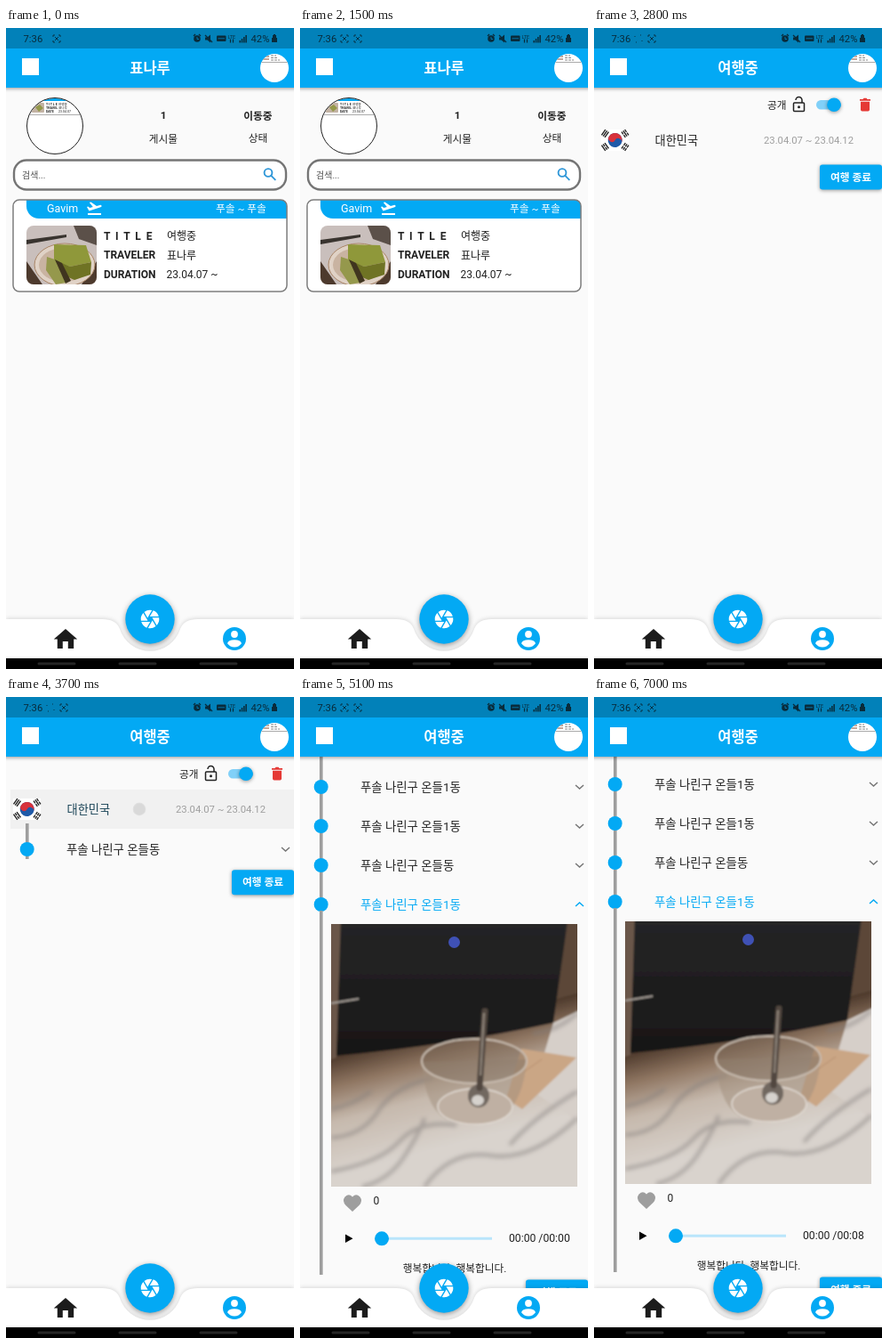
An HTML page that plays this animation: 324x720 px, repeating every 7.1 s.

```html
<!DOCTYPE html>
<html lang="ko">
<head>
<meta charset="utf-8">
<title>Travel log</title>
<style>
html, body { margin: 0; width: 100%; height: 100%; overflow: hidden; background: #fafafa; }
svg { display: block; width: 100vw; height: 100vh; }
text { font-family: Roboto, "Noto Sans CJK KR", "Noto Sans CJK", sans-serif; white-space: pre; fill: #212121; }
.b { font-weight: 700; }
.m { text-anchor: middle; }
.w { fill: #fff; }
.blue { fill: #03a9f4; }
.line { fill: none; stroke-width: 1.5; }
.raised { filter: drop-shadow(0 1.5px 2px #0006); }
.floating { filter: drop-shadow(0 2.5px 3px #0006); }
#trip { transform-origin: 162px 360px; }
</style>
</head>
<body>
<svg viewBox="0 0 324 720" preserveAspectRatio="none">
  <defs>
    <clipPath id="cRows"><rect id="rowsClip" width="324" height="273"/></clipPath>
    <clipPath id="cDetail"><rect id="detailClip" width="324" height="416"/></clipPath>
    <clipPath id="cFace"><circle cx="55" cy="110" r="31"/></clipPath>
    <clipPath id="cFace2"><circle cx="302" cy="45" r="16"/></clipPath>
    <clipPath id="cCake"><rect x="23" y="222" width="79" height="66" rx="8"/></clipPath>
    <clipPath id="cPhoto"><rect x="35" y="252" width="277" height="295"/></clipPath>
    <linearGradient id="table" gradientUnits="userSpaceOnUse" x1="140" y1="375" x2="172" y2="500">
      <stop offset="0" stop-color="#4e3a2c"/><stop offset=".25" stop-color="#8f7662"/>
      <stop offset=".55" stop-color="#c6b9ad"/><stop offset="1" stop-color="#d9d3cd"/>
    </linearGradient>
    <linearGradient id="lid" x1="0" y1="0" x2="0" y2="1">
      <stop offset="0" stop-color="#262627"/><stop offset="1" stop-color="#181717"/>
    </linearGradient>
    <filter id="soft"><feGaussianBlur stdDeviation="1.1"/></filter>
    <filter id="hazy"><feGaussianBlur stdDeviation="2"/></filter>
  </defs>
  <rect width="324" height="720" fill="#fafafa"/>

  <g id="profile">
    <g clip-path="url(#cFace)">
      <rect x="23" y="78" width="64" height="64" fill="#fff"/>
      <rect x="28" y="78" width="60" height="4" class="blue"/>
      <rect x="29" y="84" width="14" height="11" rx="1" fill="#c3b3a4"/>
      <path d="M33 89l5-3 4 4-5 4z" fill="#94994a"/>
      <path d="M24 97.500H87" stroke="#999" stroke-width=".8"/>
      <g font-size="3.600"><text class="b" x="45" y="87">T I T L E</text><text x="59" y="87">여행중</text>
      <text class="b" x="45" y="91">TRAVEL</text><text x="59" y="91">표나루</text>
      <text class="b" x="45" y="95">DATE</text><text x="59" y="95">23.04.07</text></g>
    </g>
    <circle cx="55" cy="110" r="31.500" fill="none" stroke="#222"/>
    <g class="m" font-size="11.700">
      <text class="b" x="177" y="102">1</text><text class="b" x="283.500" y="102.500">이동중</text>
      <text x="177" y="128.500">게시물</text><text x="283.500" y="128">상태</text>
    </g>
    <rect x="9" y="148.500" width="306" height="33" rx="14" fill="#fff" stroke="#757575" stroke-width="2.400"/>
    <text x="18" y="169" font-size="10" style="fill:#555">검색...</text>
    <g fill="none" stroke="#2f97d8" stroke-width="1.900"><circle cx="295" cy="162.500" r="4.400"/><path d="M298.300 165.800l5 5"/></g>

    <rect x="8" y="193" width="308" height="103" rx="7" fill="#fff"/>
    <path class="blue" d="M23 193H309Q316 193 316 200V214H37A14 14 0 0 1 23 200Z"/>
    <rect x="8" y="193" width="308" height="103" rx="7" fill="none" stroke="#7d7d7d" stroke-width="1.500"/>
    <text class="w" x="46" y="207" font-size="12.500">Gavim</text>
    <g class="w"><rect x="92" y="208" width="15" height="2"/>
      <path d="M91 201l1.300-.4 2 1.500 3.500-1-4-5 1.700-.5 6.500 4.300 3.600-1q1.800-.2 2 1 0 1-1.200 1.400L93.500 205.500Z"/></g>
    <text class="w" x="236" y="207" font-size="11.700">푸솔 ~ 푸솔</text>
    <g clip-path="url(#cCake)">
      <rect x="23" y="222" width="79" height="66" fill="#c9bfbc"/>
      <path d="M76 222h26v22l-20-7z" fill="#5b5049"/><path d="M23 238l45-6v3l-45 8z" fill="#39342f"/>
      <path d="M23 262l18 26H23zM102 262v26H85z" fill="#4d3a2d"/>
      <ellipse cx="66" cy="266" rx="34" ry="24" fill="#e0d2c6" stroke="#a98567"/>
      <ellipse cx="65" cy="266" rx="28" ry="19" fill="#c9b3a1"/>
      <path d="M54 243l36 1 6 19-24 5-18-7z" fill="#8f983a"/><path d="M54 260l18 8 24-5-1 14-18 6-18-8z" fill="#6f7324"/>
      <path d="M46 257l9 3 13 26-12 2-11-16z" fill="#95984c"/><path d="M55 260l8 4 10 20-6 3z" fill="#40351f"/>
    </g>
    <g font-size="12">
      <text class="b" x="110" y="237.500">T  I  T  L  E</text><text x="181" y="238">여행중</text>
      <text class="b" x="110" y="259.300">TRAVELER</text><text x="181" y="260">표나루</text>
      <text class="b" x="110" y="281.300">DURATION</text><text x="180.500" y="281.300">23.04.07 ~</text>
    </g>
  </g>

  <g id="trip">
    <rect width="324" height="720" fill="#fafafa"/>
    <g id="scroll">
      <text x="195" y="90.500" font-size="11.700">공개</text>
      <g class="line" stroke="#222"><rect x="224.500" y="84" width="12" height="9.500" rx="1"/><path d="M227 81a3.500 3.500 0 0 1 7 0v3"/></g>
      <circle cx="230.500" cy="88.700" r="1.500" fill="#222"/>
      <rect x="250" y="81" width="28" height="10.500" rx="5.200" fill="#81d0f8"/>
      <circle class="blue raised" cx="270" cy="86.200" r="7.800"/>
      <path d="M299 80h3.500l1-1.200h3l1 1.200h3.500v1.800h-12zM300 82.800h10v9q0 1.700-1.700 1.700h-6.600q-1.700 0-1.700-1.700z" fill="#e53935"/>
      <g id="taps"></g>
      <g id="flag"></g>
      <text id="country" x="68.500" y="131" font-size="13.200">대한민국</text>
      <text x="191" y="130.300" font-size="11.250" style="fill:#9e9e9e">23.04.07 ~ 23.04.12</text>
      <g clip-path="url(#cRows)" id="rows"></g>
      <g clip-path="url(#cDetail)"><g transform="translate(0 161)">
        <rect x="22" y="237" width="3.600" height="409" fill="#9e9e9e"/>
        <g clip-path="url(#cPhoto)"><g filter="url(#soft)">
          <rect x="25" y="242" width="297" height="315" fill="url(#table)"/>
          <path d="M285 363L322 345V480L262 440z" fill="#d6cfc9"/>
          <path d="M25 242h297v85l-36 10z" fill="#5b4739"/>
          <path d="M25 242h24l-8 160-16 6z" fill="#6b5648"/>
          <g id="veins" fill="none" stroke="#827d7b" stroke-width="4" opacity=".55" filter="url(#hazy)"></g>
          <path d="M46 242H302L285 363Q170 388 41 400Z" fill="url(#lid)"/>
          <path d="M35 341l31-5" stroke="#a49d96" stroke-width="2"/>
          <path d="M249 392l62 10-61 58-18-12z" fill="#caa685"/><path d="M252 418l20-14" stroke="#b68f6d"/>
          <path d="M137 407Q140 455 162 470Q195 486 229 468Q252 448 255 404Z" fill="#a18f7f" opacity=".5"/>
          <ellipse cx="196" cy="406" rx="59" ry="25" fill="#7d6a5b" fill-opacity=".45" stroke="#c9bdb1" stroke-width="2"/>
          <ellipse cx="197" cy="457" rx="42" ry="20" fill="#bfb0a3" stroke="#e3dcd5" stroke-width="1.500"/>
          <ellipse cx="201" cy="445" rx="12" ry="13" fill="#716860"/><ellipse cx="200" cy="450" rx="7" ry="6" fill="#d6d2cd"/>
          <path d="M208 350L202 436" stroke="#51473f" stroke-width="7" stroke-linecap="round"/>
          <path d="M207 352l-4 70" stroke="#92877d" stroke-width="2"/>
        </g></g>
        <circle cx="173.500" cy="272.500" r="6.500" fill="#3f51b5"/>
        <path d="M59 575l-7.500-7q-4.500-5-1-9.500 4.500-4.500 8.500 0 4-4.500 8.500 0 3.500 4.500-1 9.500z" fill="#9e9e9e"/>
        <text x="82.500" y="567" font-size="12">0</text>
        <path d="M51 600.500v9.500l8.500-4.800z"/>
        <path d="M92 605.300H216" stroke="#b9e5fb" stroke-width="3"/><circle class="blue" cx="92" cy="605.300" r="8"/>
        <g font-size="12.200"><text id="unloaded" x="235" y="609.300">00:00 /00:00</text><text id="loaded" x="235" y="609.300">00:00 /00:08</text></g>
        <text class="m" x="174" y="643" font-size="11.700">행복합니다. 행복합니다.</text>
      </g></g>
      <g id="finish"><rect class="blue raised" x="254" y="153.500" width="70" height="28" rx="3"/>
        <text class="b w m" x="289" y="171.700" font-size="11.700">여행 종료</text></g>
    </g>
  </g>

  <g>
    <rect class="blue raised" x="-4" y="0" width="332" height="67"/>
    <rect width="324" height="23" fill="#0281b9"/>
    <g id="status" fill="#092b3b" stroke="#092b3b" stroke-width="0"></g>
    <rect class="w" x="18" y="34" width="19" height="19"/>
    <text class="b w m" id="name" x="162" y="51" font-size="16.500">표나루</text>
    <text class="b w m" id="tripName" x="162" y="51" font-size="16.500">여행중</text>
    <circle class="w" cx="302" cy="45" r="16"/>
    <g clip-path="url(#cFace2)" stroke-width="1"><path d="M286 38.500h32" stroke="#aaa"/><path d="M289 32h7M289 35h7" stroke="#c5a79a" stroke-width="2"/>
      <path d="M298 31h6M298 33.500h8M298 36h10" stroke="#888" stroke-dasharray="3 1"/></g>
  </g>

  <path class="w" style="filter:drop-shadow(0 -1px 2px #0002)" d="M0 664H108Q124 664 128 675A35.700 35.700 0 0 0 196 675Q200 664 216 664H324V708H0Z"/>
  <path d="M63.800 697v-8h6v8h6.400v-10.500h4L67 675 53.800 686.500h4V697z" fill="#1c1c1c"/>
  <circle class="blue" cx="257" cy="686" r="13"/>
  <circle class="w" cx="257" cy="681" r="3.900"/><path class="w" d="M249 691.200q1-4 8-4t8 4q-3 4.200-8 4.200t-8-4.200z"/>
  <circle class="blue floating" cx="162" cy="664" r="27.700"/>
  <g id="shutter" class="w" transform="translate(162 664)"></g>
  <rect y="708" width="324" height="12"/>
  <path d="M37 714H77M128 714H168M219 714H259" stroke="#262626" stroke-width="3" stroke-linecap="round"/>
</svg>
<script>
const LOOP = 7100, FRAME = 100, BLUE = '#03a9f4', INK = '#212121';
const $ = id => document.getElementById(id);
const add = (id, markup) => $(id).insertAdjacentHTML('beforeend', markup);

// Static repeats
const places = ['온들동', '온들1동', '온들1동', '온들1동', '온들동', '온들1동'];
add('rows', '<rect x="22" y="142" width="3.600" height="249" fill="#9e9e9e"/>' + places.map((place, i) => {
  const y = 171 + i * 44, last = i === places.length - 1;
  const chevron = (id, dir, color) => `<path ${id} class="line" d="M310 ${y - 2 * dir}l4.500 ${4 * dir} 4.500 ${-4 * dir}" stroke="${color}"/>`;
  return `<circle class="blue" cx="23.700" cy="${y}" r="8"/>
    <text ${last ? 'id="lastPlace"' : ''} x="68" y="${y + 4.7}" font-size="13.400">푸솔 나린구 ${place}</text>`
    + chevron(last ? 'id="down"' : '', 1, '#757575') + (last ? chevron('id="up"', -1, BLUE) : '');
}).join(''));

const trigram = (x, y, angle, broken) => `<g transform="translate(${x} ${y}) rotate(${angle})">` +
  [-2.2, 0, 2.2].map((dy, i) => `<path d="M-3.800 ${dy}h7.600" stroke="#222" stroke-width="1.400" ${broken[i] ? 'stroke-dasharray="3.300 1"' : ''}/>`).join('') + '</g>';
add('flag', `<rect x="8" y="114" width="31" height="24" fill="#fff"/><g transform="rotate(30 23.700 126)">
  <circle cx="23.700" cy="126" r="8" fill="#1f5aa8"/>
  <path d="M15.700 126a8 8 0 0 1 16 0a4 4 0 0 0-8 0a4 4 0 0 1-8 0z" fill="#d8323c"/></g>` +
  trigram(12.5, 118.5, -55, [0, 0, 0]) + trigram(35, 118.5, 55, [1, 0, 1]) +
  trigram(12.5, 133.5, 55, [0, 1, 0]) + trigram(35, 133.5, -55, [1, 1, 1]));

for (let a = 0; a < 360; a += 60)
  add('shutter', `<path d="M-2.700-1.500L2.200-10A10.300 10.300 0 0 0-6.500-8L-2.800-1.400Z" transform="rotate(${a})"/>`);

add('veins', ['M35 492Q70 490 88 462T150 425', 'M35 530Q90 520 112 496T176 478', 'M70 547Q100 540 118 512T140 470',
  'M140 547Q170 505 215 512T312 470', 'M35 460Q60 455 80 440', 'M262 375Q290 372 312 352', 'M236 500Q262 470 312 440'].map(d => `<path d="${d}"/>`).join(''));

const bracket = (id, x, dots = false) => `<g id="${id}" fill="none" stroke-width=".9" transform="translate(${x} 12)">
  <path d="M-4-2v-2h2M2-4h2v2M4 2v2h-2M-2 4h-2v-2" ${dots ? 'stroke-dasharray="1 3"' : ''}/>${dots ? '' : '<path d="M-2-2l4 4M2-2l-4 4"/>'}</g>`;
const label = (x, y, size, s) => `<text x="${x}" y="${y}" font-size="${size}" style="fill:#092b3b">${s}</text>`;
add('status', label(19.5, 15.5, 11.3, '7:36') + bracket('single', 57) + bracket('left', 50) + bracket('leftDots', 50, true) + bracket('right', 65) +
  `<circle cx="215" cy="12" r="3.800"/><path d="M211 9l2-2M219 9l-2-2" stroke-width="1.300"/><path d="M215 10v2.500h2" fill="none" stroke="#0281b9" stroke-width=".9"/>
  <path d="M224 10.500h2.500l3.500-3v9l-3.500-3H224z"/><path d="M224 8l8 8" stroke-width="1.200"/>
  <rect x="237" y="8.500" width="10.500" height="6.500" rx="1"/><path d="M238.500 11.700h7.500" stroke="#0281b9" stroke-width=".8"/>` +
  label(249.5, 11.5, 5.5, 'LTE') + `<path d="M252.500 16.500v-4M255.500 12.500v4" stroke-width="1.200"/>` +
  [0, 1, 2, 3].map(i => `<rect x="${262.5 + i * 2.3}" y="${14 - i * 2}" width="1.500" height="${2.5 + i * 2}"/>`).join('') +
  label(275.5, 15.5, 11.3, '42%') + '<path d="M300 8h1v-1h2v1h1v3h1v5h-6v-5h1z"/>');

// Motion: each track is a table of [ms, value]
const tracks = [];
function move(id, prop, table, hard = false) {
  const points = [[0, table[0][1]], ...table, [LOOP, table[table.length - 1][1]]];
  const keys = points.map(([ms, value]) => ({ offset: ms / LOOP, [prop]: value, easing: hard ? 'steps(1, end)' : 'linear' }));
  const track = $(id).animate(keys, { duration: LOOP, iterations: Infinity });
  track.pause();
  tracks.push(track);
}
const show = (id, ...spans) => move(id, 'opacity', [[0, 0], ...spans.flatMap(([from, to]) => [[from, 1], [to, 0]])], true);
const shift = table => table.map(([ms, y]) => [ms, `translateY(${y}px)`]);
const reveal = (top, table) => table.map(([ms, k]) => [ms, `translateY(${top}px) scaleY(${k})`]);

function tap(name, x, y, start) {
  add('taps', `<rect id="${name}Row" x="5" y="${y - 22}" width="319" height="44" fill="#0000000a"/>
    <clipPath id="${name}Clip"><rect x="5" y="${y - 22}" width="319" height="44"/></clipPath>
    <g clip-path="url(#${name}Clip)"><circle id="${name}Ink" cx="${x}" cy="${y}" r="6.500" fill="#0000001a"/></g>`);
  move(name + 'Row', 'opacity', [[start - 100, 0], [start + 100, .8], [start + 300, 1], [start + 500, 0]]);
  move(name + 'Ink', 'opacity', [[start, 0], [start + 100, 1], [start + 200, 1], [start + 450, 0]]);
  $(name + 'Ink').style.transformOrigin = `${x}px ${y}px`;
  move(name + 'Ink', 'transform', [[start + 100, 'scale(.8)'], [start + 200, 'scale(1)'], [start + 450, 'scale(28)']]);
}
tap('country', 150, 126, 3500);
tap('place', 191, 391, 4500);

const fadeIn = [[2400, 0], [2800, 1]], fadeOut = [[2400, 1], [2800, 0]];
move('trip', 'opacity', fadeIn);
move('trip', 'transform', [[2400, 'scale(.9)'], [2800, 'scale(1)']]);
move('tripName', 'opacity', fadeIn);
move('name', 'opacity', fadeOut);
move('profile', 'opacity', fadeOut);

const unfold = [[3600, 0], [3700, .15], [3800, .55], [3900, .9], [4000, 1]];
const open = [[4700, 0], [4800, .3], [4900, .8], [5000, 1]];
move('rowsClip', 'transform', reveal(140, unfold));
move('detailClip', 'transform', reveal(391, open));
move('finish', 'transform', shift([...unfold.map(([ms, k]) => [ms, 265 * k]), ...open.map(([ms, k]) => [ms, 265 + 394 * k])]));
move('scroll', 'transform', shift([[4800, 0], [4900, -60], [5000, -130], [5100, -158], [5200, -161]]));
move('country', 'fill', [[3600, INK], [4000, BLUE]]);
move('lastPlace', 'fill', [[4700, INK], [5000, BLUE]]);
show('down', [0, 4900]);
show('up', [4900, LOOP]);
show('unloaded', [0, 5500]);
show('loaded', [5500, LOOP]);
show('single', [0, 200]);
show('left', [200, 2500], [5000, LOOP]);
show('leftDots', [2500, 5000]);
show('right', [200, LOOP]);

const begin = performance.now();
function draw() {
  const t = (performance.now() - begin) % LOOP;
  const held = Math.floor(t / FRAME) * FRAME + 1;
  for (const track of tracks) track.currentTime = held;
  requestAnimationFrame(draw);
}
draw();
</script>
</body>
</html>
```
